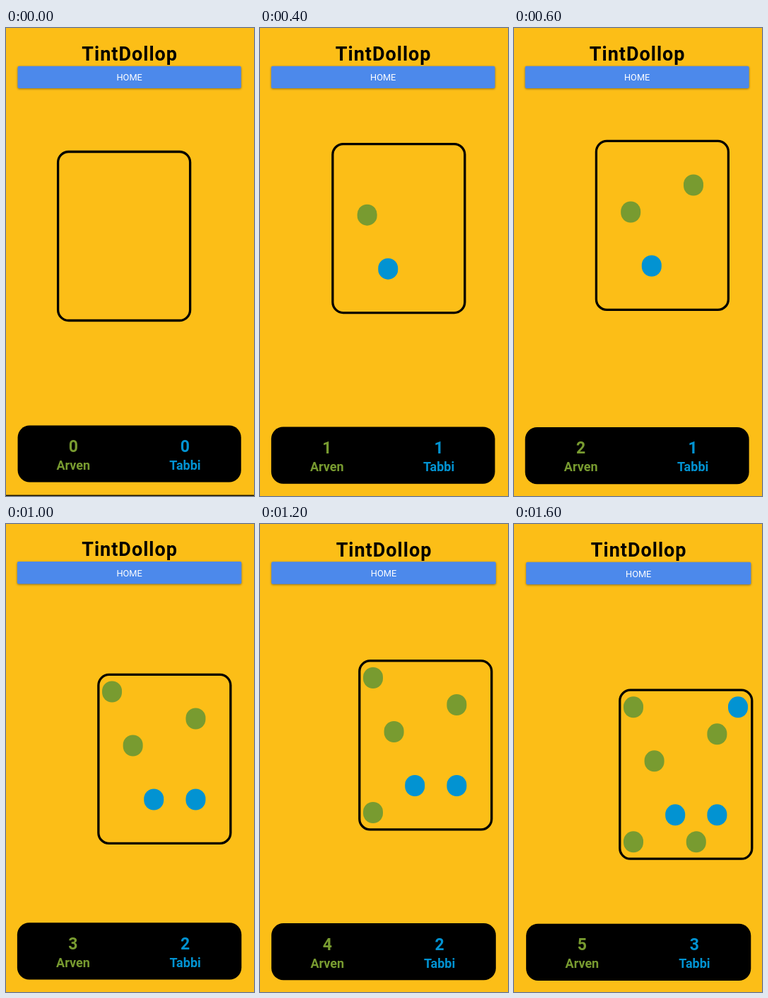
An HTML page for the animation above (1.8 s loop, 351x660 px).

```html
<!DOCTYPE html>
<html lang="en">
<head>
<meta charset="utf-8">
<title>TintDollop</title>
<style>
html, body { margin: 0; width: 100%; height: 100%; overflow: hidden; background: #fcbe17; }
svg { display: block; font-family: Roboto, sans-serif; text-anchor: middle; }
.title { font-size: 27px; font-weight: 700; letter-spacing: 1px; }
.home { font-size: 12.8px; fill: #fff; }
.score { font-size: 23px; font-weight: 700; }
.name { font-size: 18px; font-weight: 700; }
.button { fill: #4c89eb; filter: drop-shadow(0 1px 1.5px #0006); }
.board { fill: none; stroke: #000; stroke-width: 3.3px; }
</style>
</head>
<body>
<svg id="stage" width="351" height="660" viewBox="0 0 351 660"></svg>
<script>
const STEP = 200, STEPS = 9, SECOND_SHOT = 4;
const GREEN = '#789b30', BLUE = '#0293d2';

// Board path: step, x, y
const path = [
  [0, 72, 172.9], [1, 87.7, 166.2], [3, 114.8, 157.8],
  [4, 119.3, 230.3], [6, 139.2, 191.3], [8, 148.2, 232.6],
];

// One splat lands per step: column, row, colour
const splats = [
  [2, 4, BLUE], [1, 2, GREEN], [4, 1, GREEN], [4, 4, BLUE],
  [0, 0, GREEN], [0, 5, GREEN], [3, 5, GREEN], [5, 0, BLUE],
];

const rect = (x, y, w, h, r, attrs = '') =>
  `<rect x="${x}" y="${y}" width="${w}" height="${h}" rx="${r}" ${attrs}/>`;
const text = (x, y, cls, content, fill = '') =>
  `<text x="${x}" y="${y}" class="${cls}" ${fill && `fill="${fill}"`}>${content}</text>`;

function boardAt(step) {
  const next = Math.max(1, path.findIndex(([at]) => at >= step));
  const [a, b] = [path[next - 1], path[next]];
  const k = (step - a[0]) / (b[0] - a[0]);
  return [1, 2].map(i => a[i] + (b[i] - a[i]) * k);
}

// The page drifts sideways, grows a little and settles downwards in each shot
function pageAt(step) {
  const age = step % SECOND_SHOT + (step === 2 * SECOND_SHOT ? SECOND_SHOT : 0);
  const second = step >= SECOND_SHOT;
  return {
    left: 15.7 + 0.07 * (step - 3.5) ** 2,
    width: 316.2 + step / 4,
    top: second ? 52.8 + age / 4 : 53.7,
    panel: (second ? 560.9 : 560.4) + 3.2 * (1 - 2 ** (-0.8 * age)),
  };
}

function player(x, top, name, color, landed) {
  const score = landed.filter(splat => splat[2] === color).length;
  return text(x, top + 37.5, 'score', score, color) + text(x, top + 62.5, 'name', name, color);
}

function draw(step) {
  const [x, y] = boardAt(step);
  const { left, width, top, panel } = pageAt(step);
  const center = left + width / 2;
  const edge = Math.max(0, 561.9 - panel);
  const landed = splats.slice(0, step);
  stage.innerHTML =
    text(center + 0.5, top - 7.8, 'title', 'TintDollop') +
    rect(left, top, width, 31.4, 2, 'class="button"') +
    text(center, top + 20.7, 'home', 'HOME') +
    rect(x + 1.6, y + 1.6, 187, 238, 15, 'class="board"') +
    landed.map(([col, row, color]) =>
      rect(x + 6.8 + col * 29.6, y + 10.7 + row * 38, 28, 30, 14, `fill="${color}"`)).join('') +
    rect(left, panel, width, 80.2, 17) +
    player(left + width / 4 - 0.3, panel, 'Arven', GREEN, landed) +
    player(left + width * 3 / 4 - 0.3, panel, 'Tabbi', BLUE, landed) +
    rect(0, 660 - edge, 351, edge, 0, 'fill="#1c1504"');
}

const stage = document.getElementById('stage');
const start = performance.now();
let shown = -1;

function tick() {
  const step = Math.floor((performance.now() - start) / STEP) % STEPS;
  if (step !== shown) draw(shown = step);
  requestAnimationFrame(tick);
}
tick();
</script>
</body>
</html>
```
